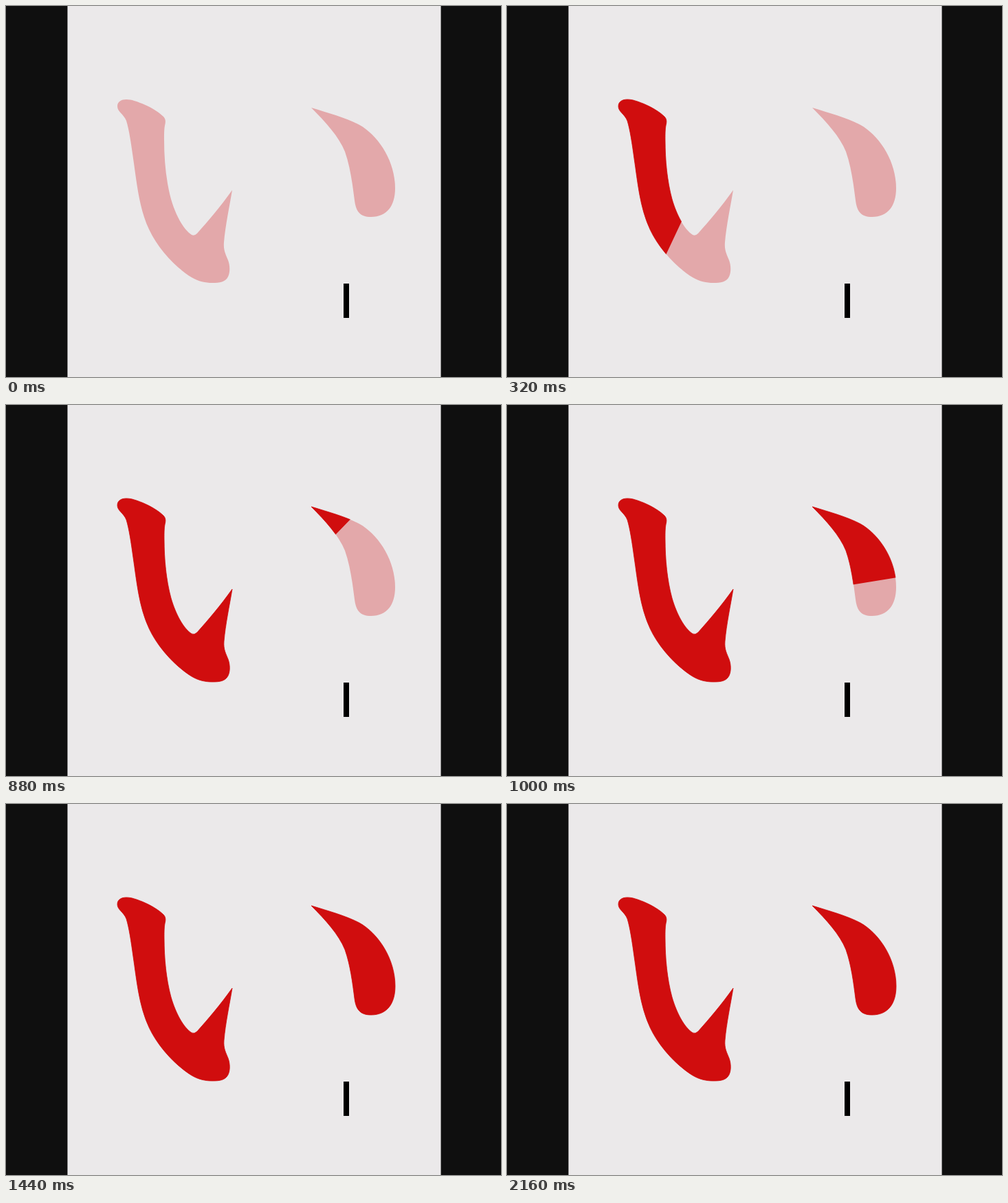
An HTML page for the animation above (2960 ms loop, 720 px wide and 540 px high).

```html
<!DOCTYPE html>
<html>
<head>
<meta charset="utf-8">
<style>
  html, body { margin: 0; width: 100%; height: 100%; overflow: hidden; background: #0f0f0f; }
  svg { display: block; width: 720px; height: 540px; }
  .glyph { filter: blur(.5px); }
  .pen { fill: none; stroke: #fff; stroke-width: 116; stroke-dasharray: 1 2; }
</style>
</head>
<body>
<svg viewBox="0 0 720 540">
  <defs>
    <path id="left" d="M162 146C162 139 168 136 175 136C183 136 190 139 198 142C210 147 222 154 229 161
      C233 165 232 170 231 174C230 180 230 186 230 195C230 225 233 255 240 281C247 305 258 325 270 333
      Q274 335 278 331C294 313 312 292 329 268C325 292 319 320 317 344C316 356 320 362 323 370
      C326 378 326 388 323 394C319 402 311 403 300 403C290 403 280 401 270 395
      C246 380 221 353 208 325C193 293 190 255 185 222C182 200 179 180 175 167C171 157 162 154 162 146Z"/>
    <path id="right" d="M444 148C470 156 495 163 514 173C541 188 566 225 566 265C566 291 554 307 531 307
      C515 307 509 299 507 283C504 260 501 235 493 212C484 190 465 169 444 148Z"/>
    <!-- Wide pens uncover the red shapes; each segment runs from..to in ms -->
    <mask id="leftMask" maskUnits="userSpaceOnUse" width="720" height="540">
      <path class="pen" pathLength="1" data-from="40" data-to="320" d="M150 128C190 150 200 175 205 215S200 340 234 356"/>
      <path class="pen" pathLength="1" data-from="320" data-to="560" d="M232 355L234 356A60 60 0 0 0 293 352"/>
      <path class="pen" pathLength="1" data-from="560" data-to="690" d="M291 353.3L293 352C318 335 332 300 335 262"/>
    </mask>
    <mask id="rightMask" maskUnits="userSpaceOnUse" width="720" height="540">
      <path class="pen" pathLength="1" data-from="800" data-to="1073" d="M440 142Q472 159 492 179C515 202 530 225 535 258L543 312"/>
    </mask>
  </defs>
  <path fill="#888" d="M89 0H633V540H89Z"/>
  <path fill="#ebe9ea" d="M90 0H632V540H90Z"/>
  <g class="glyph" fill="#e3a8aa"><use href="#left"/><use href="#right"/></g>
  <g class="glyph" fill="#d00d0e" stroke="#d00d0e" stroke-width=".8">
    <g mask="url(#leftMask)"><use href="#left"/></g>
    <g mask="url(#rightMask)"><use href="#right"/></g>
  </g>
  <path d="M491 404h8v50h-8z"/>
</svg>
<script>
const LOOP = 2960, STEP = 40;
const pens = document.querySelectorAll('.pen');
const start = performance.now();

function draw() {
  const t = Math.floor(((performance.now() - start) % LOOP) / STEP) * STEP;
  for (const pen of pens) {
    const { from, to } = pen.dataset;
    const done = Math.min(1, Math.max(0, (t - from) / (to - from)));
    pen.style.strokeDashoffset = 1 - done;
    pen.style.visibility = done ? 'visible' : 'hidden';
  }
  requestAnimationFrame(draw);
}
draw();
</script>
</body>
</html>
```
